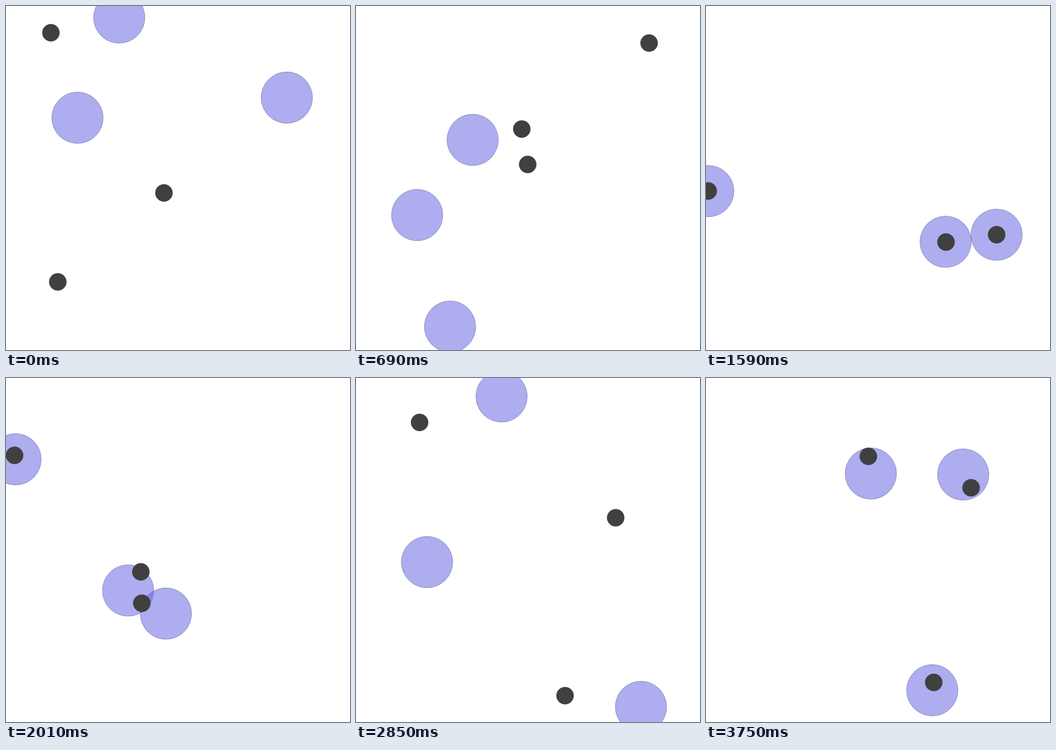
Recreate the animation shown at these times as an HTML page with a canvas. Size 700 by 700 pixels, loop 3.78 s.

```html
<!DOCTYPE html>
<html>
<head>
<meta charset="utf-8">
<style>
  html, body { margin: 0; width: 100%; height: 100%; overflow: hidden; background: #fff; }
  canvas { display: block; }
</style>
</head>
<body>
<canvas id="stage" width="700" height="700"></canvas>
<script>
const ctx = document.getElementById('stage').getContext('2d');
const SIZE = 700, STEP_MS = 30, STEPS = 126;
const EPISODE_STEPS = 18.25;  // average length of an episode
const CRUISE = 11;            // approach speed in pixels per step

// Per episode: the step of the key pose, then for each agent
// its key point (x, y) and the landmark (x, y) it heads for.
const episodes = [
  [0, [230, 23, 91, 54], [145, 227, 105, 561], [571, 186, 321, 380]],
  [23, [237, 272, 337, 250], [124, 425, 349, 322], [191, 652, 596, 75]],
  [40, [42, 431, 4, 376], [345, 360, 488, 480], [579, 475, 591, 465]],
  [67, [19, 165, 17, 157], [248, 432, 274, 394], [325, 479, 276, 458]],
  [82, [156, 222, 130, 34], [343, 204, 350, 285], [254, 610, 190, 589]],
  [107, [170, 77, 129, 90], [239, 466, 425, 646], [562, 538, 528, 284]],
  [125, [335, 194, 330, 159], [523, 196, 539, 223], [460, 635, 463, 619]]
];

const episodeStart = index => Math.floor(index * EPISODE_STEPS);
const clamp = v => Math.max(0, Math.min(SIZE, v));

function disc(x, y, radius, fill, outline) {
  ctx.beginPath();
  ctx.arc(x, y, radius, 0, 2 * Math.PI);
  ctx.fillStyle = fill;
  ctx.fill();
  ctx.strokeStyle = outline;
  ctx.stroke();
}

// Steady approach up to the key pose, then ease onto the landmark.
function agentAt([x, y, goalX, goalY], step, mid, end) {
  const dx = x - goalX, dy = y - goalY;
  const rest = step <= mid
    ? 1 + CRUISE * (mid - step) / Math.hypot(dx, dy)
    : (1 - (step - mid) / (end - mid)) ** 2;
  return [clamp(goalX + dx * rest), clamp(goalY + dy * rest)];
}

function draw(now) {
  const step = Math.floor(now / STEP_MS) % STEPS;
  const index = episodes.findLastIndex((_, i) => episodeStart(i) <= step);
  const [mid, ...agents] = episodes[index];
  const end = Math.min(STEPS, episodeStart(index + 1));

  ctx.setTransform(1, 0, 0, 1, 0.4, 0.4);
  ctx.clearRect(-1, -1, SIZE + 2, SIZE + 2);
  for (const agent of agents) {
    const [x, y] = agentAt(agent, step, mid, end);
    disc(x, y, 52.3, 'rgba(92,92,224,.5)', 'rgba(45,45,109,.4)');
  }
  for (const [, , x, y] of agents) disc(x, y, 17.5, '#404040', 'rgba(32,32,32,.5)');
}

const origin = performance.now();
function tick() {
  draw(performance.now() - origin);
  requestAnimationFrame(tick);
}
tick();
</script>
</body>
</html>
```
